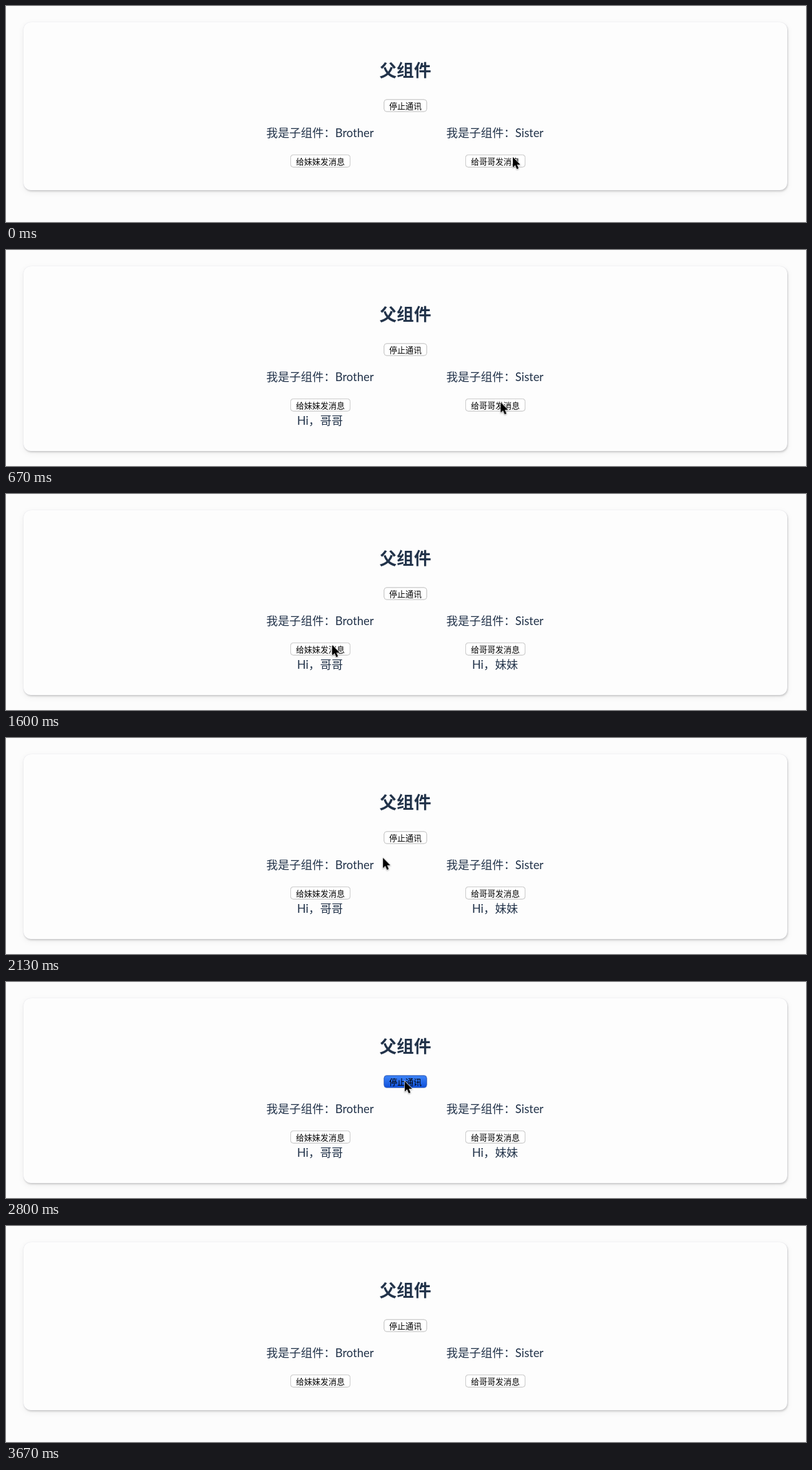
An HTML page for the animation above (3740 ms loop, 1280x346 px).

```html
<!DOCTYPE html>
<html lang="zh-CN">
<head>
<meta charset="utf-8">
<title>组件通讯</title>
<style>
  html, body { margin: 0; width: 100%; height: 100%; overflow: hidden; background: #fcfcfc; }
  .stage { position: relative; width: 1280px; height: 346px; overflow: hidden; }
  .card {
    position: absolute; left: 28px; top: 26px; width: 1222px; height: 269px;
    border-radius: 12px; background: #fdfdfd;
    box-shadow: 0 0 1px rgba(90, 90, 150, .2), 1px 2px 3px rgba(0, 0, 0, .17), 0 3px 12px rgba(0, 0, 0, .06);
  }
  svg { position: absolute; left: 0; top: 0; }
  text { font: 18.4px Lato, "Noto Sans CJK SC", sans-serif; fill: #22334a; }
  .title { font-size: 27.6px; font-weight: 700; }
  .label { font-size: 13px; fill: #000; text-anchor: middle; }
  .face { fill: #fff; stroke: #c9c9c9; filter: drop-shadow(0 .6px .4px rgba(0, 0, 0, .25)); }
  .down { fill: url(#blue); stroke: #1f55c4; opacity: 0; }

  .card, .down, .msg, .cursor { animation: 3740ms step-end infinite; }
  .card { animation-name: grow; }
  .sister .down { animation-name: press-sister; }
  .brother .down { animation-name: press-brother; }
  .parent .down { animation-name: press-parent; }
  .msg { opacity: 0; }
  .to-brother { animation-name: to-brother; }
  .to-sister { animation-name: to-sister; }
  .cursor { animation-name: point; animation-timing-function: linear; filter: drop-shadow(0 1.5px 1.2px rgba(0, 0, 0, .35)); }

  @keyframes grow { 0%, 78.34% { height: 269px } 10.7% { height: 295.5px } }
  @keyframes to-brother { 0%, 78.34% { opacity: 0 } 10.7% { opacity: 1 } }
  @keyframes to-sister { 0%, 78.34% { opacity: 0 } 39.3% { opacity: 1 } }
  @keyframes press-sister { 0%, 10.7% { opacity: 0 } 7.22% { opacity: 1 } }
  @keyframes press-brother { 0%, 39.3% { opacity: 0 } 35.56% { opacity: 1 } }
  @keyframes press-parent { 0%, 78.34% { opacity: 0 } 72.99% { opacity: 1 } }
  @keyframes point {
    0% { transform: translate(811px, 242px) }
    14.17% { transform: translate(811px, 242px); animation-timing-function: ease-in }
    17.91% { transform: translate(792px, 244px); animation-timing-function: cubic-bezier(.35, .3, .4, 1) }
    32.08%, 44.65% { transform: translate(522px, 242px); animation-timing-function: ease-in-out }
    56.95% { transform: translate(603px, 192px); animation-timing-function: ease-out }
    68%, 87.43% { transform: translate(638px, 159px); animation-timing-function: ease-in }
    96.26%, 100% { transform: translate(700px, 352px) }
  }
</style>
</head>
<body>
<div class="stage">
  <div class="card"></div>
  <svg width="1280" height="346">
    <defs>
      <linearGradient id="blue" x2="0" y2="1">
        <stop stop-color="#3f86f8"/>
        <stop offset="1" stop-color="#0f50dc"/>
      </linearGradient>
    </defs>

    <text class="title" x="597.5" y="113">父组件</text>
    <text x="416.5" y="209.8">我是子组件：Brother</text>
    <text x="704.5" y="209.8">我是子组件：Sister</text>

    <g class="parent" transform="translate(639 159.5)">
      <rect class="face" x="-34" y="-9.5" width="68" height="19" rx="4"/>
      <rect class="down" x="-34" y="-9.5" width="68" height="19" rx="4"/>
      <text class="label" y="5.2">停止通讯</text>
    </g>
    <g class="brother" transform="translate(503 248.5)">
      <rect class="face" x="-47.5" y="-10" width="95" height="19.5" rx="4"/>
      <rect class="down" x="-47.5" y="-10" width="95" height="19.5" rx="4"/>
      <text class="label" y="5.2">给妹妹发消息</text>
    </g>
    <g class="sister" transform="translate(783 248.5)">
      <rect class="face" x="-47.5" y="-10" width="95" height="19.5" rx="4"/>
      <rect class="down" x="-47.5" y="-10" width="95" height="19.5" rx="4"/>
      <text class="label" y="5.2">给哥哥发消息</text>
    </g>

    <text class="msg to-brother" x="465.7" y="280.3">Hi，哥哥</text>
    <text class="msg to-sister" x="745.7" y="280.3">Hi，妹妹</text>

    <path class="cursor" d="M0 0V16.5L3.8 13L6.4 19.2L9.2 18L6.6 12H11.8Z" stroke="#fff" stroke-width="1.2" paint-order="stroke"/>
  </svg>
</div>
</body>
</html>
```
